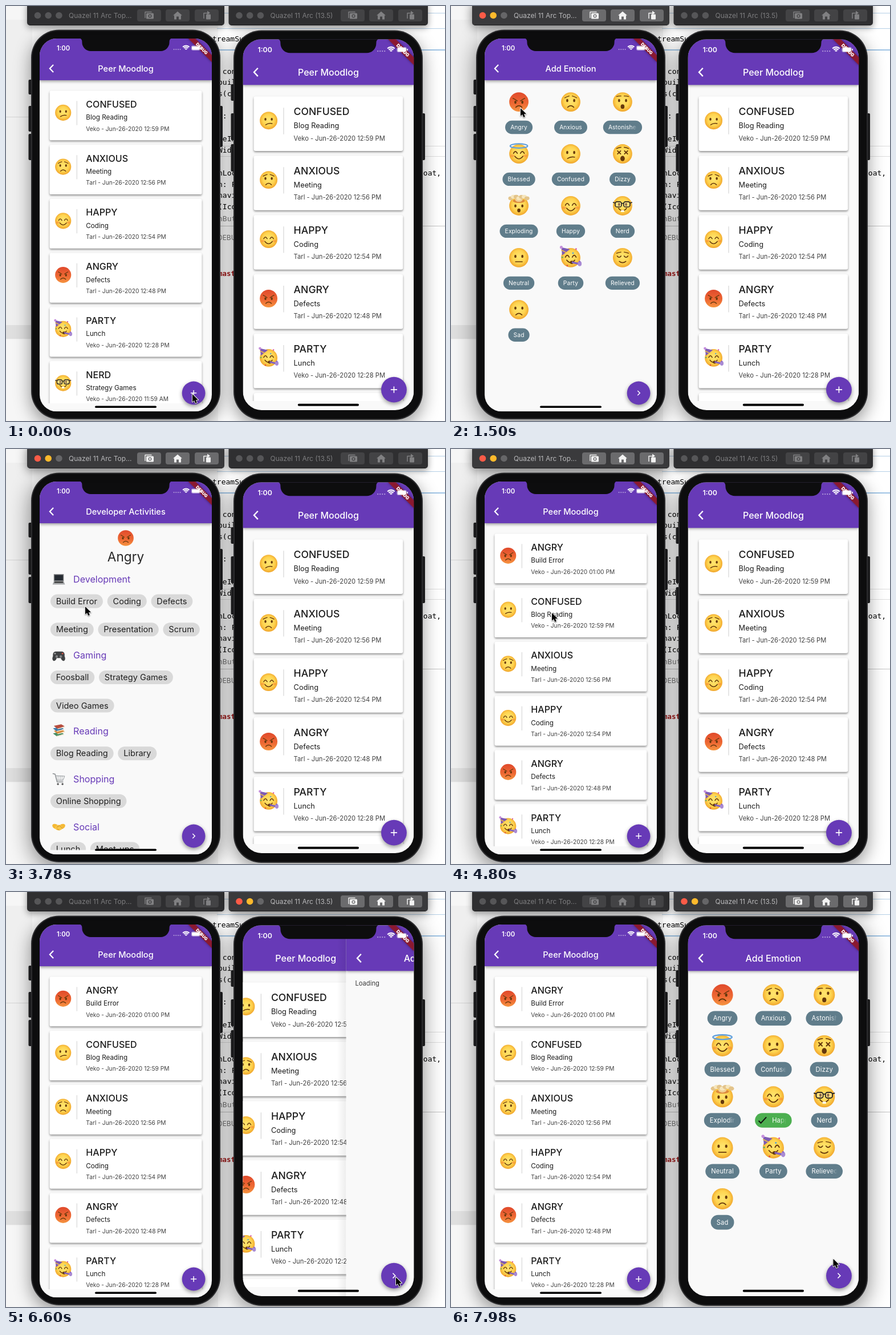
These frames come from a looping animation (770x727 px, 8000 ms). An HTML page with a canvas:

```html
<!DOCTYPE html>
<html lang="en">
<head>
<meta charset="utf-8">
<title>Two phones</title>
<style>
html, body { margin: 0; width: 100%; height: 100%; overflow: hidden; background: #fff; }
canvas { display: block; width: 100%; height: 100%; }
</style>
</head>
<body>
<canvas id="stage" width="770" height="727"></canvas>
<script>
const c = document.getElementById('stage').getContext('2d');
const LOOP = 8000, TAU = Math.PI * 2;
const SANS = 'Inter, sans-serif', MONO = '"DejaVu Sans Mono", monospace';
const PURPLE = '#673ab7', GREEN = '#4caf50', SLATE = '#607d8b', BROWN = '#65380c';
const APP = 'Peer Moodlog';
const clamp = v => Math.max(0, Math.min(1, v));

// ---------- timing ----------
const T = { wakeLeft: 150, add: 480, pickAngry: 1620, acts: 2660, pickBuild: 3900, done: 4340,
            wakeRight: 6240, addRight: 6539, pickHappy: 7480 };
const PATH = [[0, 327, 680], [560, 327, 680], [1440, 122, 179], [1700, 122, 179], [2460, 329, 676],
  [2780, 329, 676], [3600, 139, 276], [3960, 139, 276], [4260, 329, 676], [4380, 329, 676],
  [4780, 177, 287], [5300, 177, 287], [6060, 684, 675], [6720, 684, 675], [7260, 566, 392],
  [7540, 566, 392], [8097, 684, 675]];

// cubic-bezier(.35,.91,.33,.97), used for page slides
function slide(t, start) {
  const x = clamp((t - start) / 400);
  const bez = (a, b, u) => 3 * a * u * (1 - u) ** 2 + 3 * b * u * u * (1 - u) + u ** 3;
  let lo = 0, hi = 1;
  for (let i = 0; i < 20; i++) {
    const m = (lo + hi) / 2;
    if (bez(.35, .33, m) < x) lo = m; else hi = m;
  }
  return x === 1 ? 1 : x === 0 ? 0 : bez(.91, .97, lo);
}

// ---------- drawing helpers ----------
function text(s, x, y, size, color, weight = 400, align = 'left', family = SANS) {
  c.font = `${weight} ${size}px ${family}`;
  c.textAlign = align;
  c.fillStyle = color;
  c.fillText(s, x, y);
}
function box(x, y, w, h, r, color) {
  c.beginPath();
  c.roundRect(x, y, w, h, r);
  c.fillStyle = color;
  c.fill();
}
function oval(x, y, rx, ry, color, rot = 0) {
  c.beginPath();
  c.ellipse(x, y, rx, ry, rot, 0, TAU);
  c.fillStyle = color;
  c.fill();
}
function line(pts, color, w) {
  c.beginPath();
  for (let i = 0; i < pts.length; i += 2) c.lineTo(pts[i], pts[i + 1]);
  c.strokeStyle = color;
  c.lineWidth = w;
  c.stroke();
}
function poly(pts, color) {
  c.beginPath();
  for (let i = 0; i < pts.length; i += 2) c.lineTo(pts[i], pts[i + 1]);
  c.closePath();
  c.fillStyle = color;
  c.fill();
}
function curve(p, w = .1, color = BROWN) {
  c.beginPath();
  c.moveTo(p[0], p[1]);
  c.quadraticCurveTo(p[2], p[3], p[4], p[5]);
  c.strokeStyle = color;
  c.lineWidth = w;
  c.stroke();
}
function shadow(blur, dy, alpha) {
  c.shadowBlur = blur;
  c.shadowOffsetY = dy;
  c.shadowColor = `rgba(0,0,0,${alpha})`;
}
function at(x, y, k, draw) {
  c.save();
  c.translate(x, y);
  c.scale(k, k);
  c.lineCap = c.lineJoin = 'round';
  draw();
  c.restore();
}

// ---------- faces: unit radius ----------
const SMILE = [-.42, .25, 0, .78, .42, .25], FROWN = [-.32, .55, 0, .22, .32, .55];
const FACES = {
  Angry: { mouth: FROWN, brow: [-.1, -.38], eyeY: .02 },
  Anxious: { mouth: FROWN, brow: [-.62, -.42] },
  Astonished: { round: .23, brow: [-.62, -.56] },
  Blessed: { eyes: 'arch', mouth: SMILE, blush: true },
  Confused: { mouth: [-.33, .48, .02, .24, .4, .34] },
  Dizzy: { eyes: 'x', round: .27, brow: [-.68, -.55] },
  Exploding: { round: .2, eyeY: .02 },
  Happy: { eyes: 'arch', mouth: SMILE, blush: true },
  Nerd: { mouth: SMILE },
  Neutral: { mouth: [-.35, .42, 0, .42, .35, .42] },
  Party: { eyes: 'arch', mouth: SMILE },
  Relieved: { eyes: 'shut', mouth: [-.34, .38, 0, .66, .34, .38], brow: [-.58, -.46] },
  Sad: { mouth: FROWN }
};
function skin(kind) {
  const angry = kind === 'Angry';
  const g = angry ? c.createLinearGradient(0, -1, 0, 1) : c.createRadialGradient(0, -.1, .1, 0, -.05, 1.05);
  const tones = angry ? ['#e04a2c', '#ee6a34', '#f59440'] : ['#ffe36c', '#fed34f', '#f0a52c'];
  tones.forEach((v, i) => g.addColorStop([0, .6, 1][i], v));
  return g;
}
function face(kind, x, y, r) {
  const f = FACES[kind], ey = f.eyeY ?? -.15;
  at(x, y, r, () => {
    oval(0, 0, 1, 1, skin(kind));
    if (f.blush) for (const s of [-1, 1]) oval(s * .68, .2, .2, .14, 'rgba(245,120,50,.45)');
    for (const s of [-1, 1]) {
      const ex = s * .36;
      if (f.eyes === 'arch') curve([ex - .2, ey + .1, ex, ey - .3, ex + .2, ey + .1]);
      else if (f.eyes === 'shut') curve([ex - .2, ey - .02, ex, ey + .24, ex + .2, ey - .02]);
      else if (f.eyes === 'x') {
        line([ex - .16, ey - .16, ex + .16, ey + .16], BROWN, .11);
        line([ex - .16, ey + .16, ex + .16, ey - .16], BROWN, .11);
      } else oval(ex, ey, .11, .16, BROWN);
      if (f.brow) curve([s * .16, f.brow[0], s * .4, (f.brow[0] + f.brow[1]) / 2 - .04, s * .62, f.brow[1]], .08);
    }
    if (f.mouth) curve(f.mouth);
    if (f.round) oval(0, .48, f.round * .85, f.round, BROWN);
    if (EXTRA[kind]) EXTRA[kind]();
  });
}
const EXTRA = {
  Blessed() {
    c.beginPath();
    c.ellipse(0, -.82, .9, .22, 0, 0, TAU);
    c.strokeStyle = '#5f9fdc';
    c.lineWidth = .13;
    c.stroke();
  },
  Nerd() {
    for (const s of [-1, 1]) {
      c.beginPath();
      c.roundRect(s * .44 - .33, -.42, .66, .54, .2);
      c.fillStyle = 'rgba(255,255,255,.25)';
      c.fill();
      c.strokeStyle = '#2b2724';
      c.lineWidth = .1;
      c.stroke();
      line([s * .78, -.3, s * .96, -.34], '#2b2724', .1);
    }
    line([-.1, -.25, .1, -.25], '#2b2724', .1);
    box(-.17, .46, .34, .18, .04, '#fff');
  },
  Exploding() {
    oval(0, -.5, .62, .2, '#dd8a3c');
    oval(0, -.66, .4, .26, '#f0cf92');
    for (let i = 0; i < 7; i++)
      oval(-.84 + i * .28, -.78 - .2 * Math.sin(i * 2.1) ** 2, .26, .2, i % 2 ? '#f6e6bd' : '#e3c48b');
  },
  Party() {
    poly([-.98, -1.08, -.88, -.25, -.08, -.88], '#7d5bb4');
    line([-.95, -.78, -.5, -.56], '#e9b84b', .1);
    oval(-.98, -1.08, .15, .15, '#c590dc');
    oval(.12, .48, .2, .17, BROWN);
    line([.2, .48, .86, .64], '#8464bd', .2);
    oval(.93, .62, .2, .26, '#a98bd4');
    ['#d9539c', '#4aa3df', '#57b26a', '#8b62c4', '#e24d42'].forEach((v, i) =>
      oval(.98 * Math.sin(i * 2.3 + .6), -.9 + .43 * i, .08, .08, v));
  }
};

// ---------- activity icons: about 30 units wide ----------
const ICONS = [
  () => { poly([-12, -12, 12, -12, 12, 5, -12, 5], '#77797b'); box(-10, -10, 20, 13, 0, '#252b32');
          poly([-12, 5, 12, 5, 15, 13, -15, 13], '#a9abad'); poly([-10, 6, 10, 6, 11, 9, -11, 9], '#333'); },
  () => { box(-14, -9, 28, 16, 7, '#404244'); oval(-10, 6, 5, 8, '#404244', .3); oval(10, 6, 5, 8, '#404244', -.3);
          oval(-5, 3, 3, 3, '#808284'); oval(5, 3, 3, 3, '#808284'); oval(9, -4, 2, 2, '#d95745'); oval(-9, -4, 2, 2, '#aaa'); },
  () => ['#498d63', '#d7883a', '#3d79a8', '#b74c3d'].forEach((v, i) => {
          const y = 7 - i * 6, x = i % 2 ? 1 : -1;
          poly([x - 13, y - 2, x + 5, y - 6, x + 13, y - 1, x - 4, y + 5], v);
          line([x - 3, y + 5, x + 13, y + 1], '#f0e6cf', 2); }),
  () => { line([-14, -13, -9, -12, -4, 7, 10, 7], '#898d90', 2); line([-8, -8, 14, -7, 10, 3, -5, 3], '#a3a7aa', 1.6);
          for (let i = 0; i < 4; i++) line([-4 + i * 4, -8, -3 + i * 3.6, 3], '#a3a7aa', 1);
          oval(-2, 12, 2.4, 2.4, '#555'); oval(9, 12, 2.4, 2.4, '#555'); },
  () => { oval(-8, -1, 8, 5.5, '#f5b935', .5); oval(8, -1, 8, 5.5, '#f5b935', -.5); oval(0, 2, 9, 6.5, '#f9c748');
          line([-5, 1, 2, -3, 9, 4], '#c98520', 1.3); line([-4, 5, 1, 8], '#c98520', 1.2); }
];
const SECTIONS = [
  ['Development', ['Build Error', 'Coding', 'Defects'], ['Meeting', 'Presentation', 'Scrum']],
  ['Gaming', ['Foosball', 'Strategy Games'], ['Video Games']],
  ['Reading', ['Blog Reading', 'Library']],
  ['Shopping', ['Online Shopping']],
  ['Social', ['Lunch', 'Meet-ups']]
];
const ENTRIES = [
  ['Angry', 'Build Error', 'Veko', '01:00 PM'], ['Confused', 'Blog Reading', 'Veko', '12:59 PM'],
  ['Anxious', 'Meeting', 'Tarl', '12:56 PM'], ['Happy', 'Coding', 'Tarl', '12:54 PM'],
  ['Angry', 'Defects', 'Tarl', '12:48 PM'], ['Party', 'Lunch', 'Veko', '12:28 PM'],
  ['Nerd', 'Strategy Games', 'Veko', '11:59 AM']
];

// ---------- pages, in logical phone units ----------
function page(p, title, dx, body, edge) {
  c.save();
  c.translate(dx, 0);
  if (edge) {
    const g = c.createLinearGradient(-20, 0, 0, 0);
    g.addColorStop(0, 'rgba(0,0,0,0)');
    g.addColorStop(1, 'rgba(0,0,0,.07)');
    c.fillStyle = g;
    c.fillRect(-20, 0, 20, p.h);
  }
  c.beginPath();
  c.rect(0, 0, p.w, p.h);
  c.clip();
  box(0, 0, p.w, p.h, 0, '#f9f9f9');
  body();
  c.save();
  shadow(5, 2, .4);
  box(0, 0, p.w, 100, 0, PURPLE);
  c.restore();
  c.lineCap = 'butt';
  line([33, 63, 24.5, 72, 33, 81], '#fff', 3);
  text(title, p.w / 2, 79, 20, '#fff', 500, 'center');
  c.restore();
}
function list(p, first) {
  c.save();
  c.beginPath();
  c.rect(0, 100, p.w, p.h - 120);
  c.clip();
  ENTRIES.slice(first).forEach(([mood, what, who, when], i) => {
    const y = 125 + i * 129.9;
    if (y > p.h) return;
    c.save();
    shadow(3.5, 2, .42);
    box(24, y, p.w - 48, 119.5, 4, '#fff');
    c.restore();
    face(mood, 56.5, y + 53, 19.3);
    line([89.5, y + 25, 89.5, y + 83], '#cfcfcf', 1.3);
    text(mood.toUpperCase(), 111.5, y + 40.7, 22, '#1c1c1c', 500);
    text(what, 111.5, y + 70, 16, '#1c1c1c');
    text(`${who} - Jun-26-2020 ${when}`, 111.5, y + 96.5, 14, '#404040');
  });
  c.restore();
}
function grid(p, picked, amount) {
  const cell = (p.w - 40) / 3, max = cell - 31;
  c.save();
  c.letterSpacing = '0.2px';
  Object.keys(FACES).forEach((name, i) => {
    const x = 20 + cell * (i % 3 + .5), top = 120 + cell * Math.floor(i / 3);
    const on = name === picked ? amount : 0;
    face(name, x, top + 32.3, 23.2);
    c.font = `400 14px ${SANS}`;
    const tw = c.measureText(name).width, room = 25 * on;
    const w = Math.min(tw + 25 + room, max), left = x - w / 2, y = top + cell * .725 + 2.8;
    box(left, y - 16, w, 32, 16, on > .3 ? GREEN : SLATE);
    const tx = left + 12.5 + room, end = left + w - 12;
    let ink = '#fff';
    if (tx + tw > end) {
      ink = c.createLinearGradient(end - 16, 0, end, 0);
      ink.addColorStop(0, '#fff');
      ink.addColorStop(1, 'rgba(255,255,255,0)');
    }
    c.save();
    c.beginPath();
    c.rect(left, y - 16, w - 12, 32);
    c.clip();
    if (on > .3) line([left + 8, y + 1, left + 13, y + 6, left + 25, y - 7], '#111', 2.4);
    text(name, tx, y + 5, 14, ink);
    c.restore();
  });
  c.restore();
}
function activities(p, picked) {
  face('Angry', p.w / 2, 135.7, 19);
  text('Angry', p.w / 2, 192.5, 31, '#262626', 400, 'center');
  let y = 234.4;
  c.save();
  c.beginPath();
  c.rect(0, 100, p.w, 785);
  c.clip();
  SECTIONS.forEach(([name, ...rows], i) => {
    at(46, y, 1, ICONS[i]);
    text(name, 81, y + 8, 22, PURPLE);
    y += 53;
    rows.forEach((row, j) => {
      let x = 26;
      if (j) y += 68;
      for (const label of row) {
        c.font = `400 20px ${SANS}`;
        const w = c.measureText(label).width + 27;
        box(x, y - 16.5, w, 33, 16.5, picked === label ? GREEN : '#d9d9d9');
        text(label, x + 13.5, y + 7, 20, '#1f1f1f');
        x += w + 10.6;
      }
    });
    y += 61.7;
  });
  c.restore();
}
const loading = () => text('Loading', 20, 132.5, 14, '#3a3a3a');

function leftApp(p, t) {
  const a = slide(t, T.add), b = slide(t, T.acts), d = slide(t, T.done);
  const home = (first, k) => page(p, APP, -p.w / 3 * k, () => list(p, first));
  const acts = dx => page(p, 'Developer Activities', dx, () => activities(p, t > T.pickBuild ? 'Build Error' : ''), true);
  const add = dx => page(p, 'Add Emotion', dx,
    () => t < T.add + 200 ? loading() : grid(p, 'Angry', clamp((t - T.pickAngry) / 150)), true);
  if (t >= T.done) {
    home(0, 1 - d);
    if (d < 1) acts(p.w * d);
  } else if (t >= T.acts) {
    if (b < 1) add(-p.w / 3 * b);
    acts(p.w * (1 - b));
  } else {
    if (a < 1) home(1, a);
    if (a > 0) add(p.w * (1 - a));
  }
  return t < T.add || t >= T.done;
}
function rightApp(p, t) {
  const a = slide(t, T.addRight);
  if (a < 1) page(p, APP, -p.w / 3 * a, () => list(p, 1));
  if (a > 0) page(p, 'Add Emotion', p.w * (1 - a),
    () => t < T.addRight + 220 ? loading() : grid(p, 'Happy', clamp((t - T.pickHappy) / 150)), true);
  return t < T.addRight;
}

// ---------- phone shell ----------
function fab(p, plus) {
  const x = p.w - 43.7, y = p.h - 44.7;
  c.save();
  shadow(7, 3, .4);
  oval(x, y, 28, 28, PURPLE);
  c.restore();
  if (plus) {
    line([x - 7, y, x + 7, y], '#fff', 2);
    line([x, y - 7, x, y + 7], '#fff', 2);
  } else line([x - 2.5, y - 5.5, x + 3, y, x - 2.5, y + 5.5], '#fff', 2);
}
function banner(p) {
  c.save();
  c.translate(p.w, 0);
  c.rotate(Math.PI / 4);
  shadow(4, 0, .5);
  box(-40, 28, 80, 12, 0, 'rgba(150,25,40,.88)');
  c.shadowColor = 'transparent';
  text('DEBUG', 0, 37.7, 10.2, '#fff', 900, 'center');
  c.restore();
}
function status(p) {
  const e = p.w - p.inset;
  text('1:00', p.clock, 28.6, 15.5, '#fff', 600);
  for (let i = 0; i < 4; i++) oval(e - 79 + i * 5, 26, 1.3, 1.3, 'rgba(255,255,255,.55)');
  c.lineCap = 'butt';
  for (const r of [3, 7, 11]) {
    c.beginPath();
    c.arc(e - 50, 28, r, -Math.PI * .75, -Math.PI * .25);
    c.strokeStyle = '#fff';
    c.lineWidth = 2.7;
    c.stroke();
  }
  c.beginPath();
  c.roundRect(e - 37, 17.5, 21, 10.5, 3);
  c.strokeStyle = 'rgba(255,255,255,.6)';
  c.lineWidth = 1;
  c.stroke();
  box(e - 36, 18.5, 19, 8.5, 2, '#fff');
  box(e - 15, 20.5, 2, 4.5, 1, '#fff');
}
function notch(p) {
  const m = p.w / 2;
  c.beginPath();
  c.moveTo(m - 112, -1);
  c.quadraticCurveTo(m - 105, 0, m - 105, 8);
  c.arcTo(m - 105, 30, m, 30, 21);
  c.arcTo(m + 105, 30, m + 105, 8, 21);
  c.lineTo(m + 105, 8);
  c.quadraticCurveTo(m + 105, 0, m + 112, -1);
  c.fillStyle = '#0d0d0e';
  c.fill();
}
function toolbar(p, active) {
  c.save();
  shadow(active ? 18 : 12, 4, active ? .5 : .4);
  box(p.bar, -8, p.barW, 42, 5, active ? '#3a3a3c' : '#2f2f31');
  c.restore();
  line([p.bar + 4, 33.5, p.bar + p.barW - 4, 33.5], '#1c1c1d', 1);
  (active ? ['#fc5b47', '#fdb92c', '#666668'] : ['#565658', '#565658', '#565658'])
    .forEach((v, i) => oval(p.bar + 18.5 + i * 18.7, 16.5, 5.8, 5.8, v));
  text(p.name, p.bar + 73, 21, 12, active ? '#b9b9bb' : '#7d7d7f');
  const ink = active ? '#f2f2f2' : '#808082', bg = active ? '#6b6b6d' : '#434345';
  p.buttons.forEach((x, i) => {
    box(x, 6, 42, 21, 4, bg);
    at(x + 21, 16.5, 1, () => {
      if (i === 0) {
        line([-7, 4, -7, -6, 4, -6], ink, 1.4);
        box(-5, -4, 13, 10, 1.5, ink);
        oval(1.5, 1, 3, 3, bg);
        oval(1.5, 1, 1.7, 1.7, ink);
      } else if (i === 1) {
        poly([-8, 0, 0, -7, 8, 0, 6, 0, 6, 7, 2, 7, 2, 2, -2, 2, -2, 7, -6, 7, -6, 0], ink);
      } else {
        box(-1, -2, 8, 9, 1, ink);
        line([-5, 5, -5, -4, 2, -4], ink, 1.5);
        poly([1, -8, 6, -4.5, 1, -1], ink);
      }
    });
  });
}
function phone(p, t, active) {
  for (const [y, h] of p.keys) box(p.x - 5.5, y, 9, h, 2, '#222224');
  box(p.x + 326, p.keys[1][0], 9, p.power, 2, '#222224');
  c.save();
  shadow(active ? 38 : 30, 10, active ? .48 : .42);
  box(p.x - 1, p.y - .5, 332, 682.5, 49, '#2c2c2e');
  c.restore();
  box(p.x + 1, p.y + 1.5, 328, 678.5, 47, '#0d0d0e');
  c.save();
  c.translate(p.sx, p.sy);
  c.scale(p.k, p.k);
  c.beginPath();
  c.roundRect(0, 0, p.w, p.h, 41);
  c.clip();
  const plus = p.app(p, t);
  fab(p, plus);
  banner(p);
  status(p);
  notch(p);
  box(p.w / 2 - p.home / 2, p.h - 14, p.home, 5, 2.5, '#050505');
  c.restore();
  toolbar(p, active);
}
const LEFT = { x: 45, y: 42, sx: 59, sy: 57, k: 302 / 414, w: 414, h: 896, app: leftApp, home: 148,
  clock: 41, inset: 12, bar: 37, barW: 346, name: 'Quazel 11 Arc Top...', buttons: [230, 280, 331],
  keys: [[129, 26], [175, 45], [224, 46]], power: 72 };
const RIGHT = { x: 400, y: 43, sx: 415.4, sy: 58.3, k: .8, w: 375, h: 812, app: rightApp, home: 134,
  clock: 32.5, inset: 0, bar: 390.5, barW: 349.5, name: 'Quazel 11 Arc (13.5)', buttons: [587, 637, 688],
  keys: [[137, 29], [188, 47], [242, 48]], power: 82 };

// ---------- desktop behind the phones ----------
const CODE = [['treamSu', 362, 62], [' con', 372, 119], ['buil', 372, 138], ['s(co', 372, 158], ['e:', 372, 197],
  ['geIn', 372, 237], ['Widg', 372, 257], ['nLoc', 372, 297], ['loat,', 724, 297], ['n: Fl', 372, 317],
  ['navi', 372, 336], ['(Icon', 372, 356]];
function desktop() {
  box(0, 0, 770, 727, 0, '#fff');
  box(0, 0, 372, 727, 0, '#f6f6f6');
  box(0, 24, 46, 560, 0, '#efefef');
  box(0, 559, 46, 24, 0, '#dfdfdf');
  line([0, 194.5, 46, 194.5], '#d4d4d4', 1);
  for (const y of [12.5, 39.5]) line([370, y, 770, y], '#b5cfe6', 1);
  line([362, 77, 770, 77], '#7fb0dc', 1.6);
  for (const y of [245.5, 263.5]) line([370, y, 770, y], '#dedede', 1);
  line([370, 385.5, 770, 385.5], '#c4c4c4', 1);
  for (const [s, x, y] of CODE) text(s, x, y, 13, '#000', 400, 'left', MONO);
  text('nBut', 372, 377, 13, '#777', 400, 'left', MONO);
  text('DEBUG', 371, 410, 12, '#777');
  text('maste', 372, 473, 12.5, '#a31515', 700, 'left', MONO);
}
function cursor(t) {
  const i = PATH.findIndex((k, n) => n && t < k[0]);
  const [t0, x0, y0] = PATH[i - 1], [t1, x1, y1] = PATH[i];
  const u = (t - t0) / (t1 - t0), e = u * u * (3 - 2 * u);
  at(x0 + (x1 - x0) * e, y0 + (y1 - y0) * e, 1, () => {
    const arrow = [0, 0, 0, 13.5, 3.2, 10.8, 5.4, 15.8, 7.8, 14.8, 5.7, 9.9, 10, 9.9];
    shadow(2, 1, .35);
    line([...arrow, 0, 0], '#fff', 2);
    poly(arrow, '#000');
  });
}

function draw(now) {
  const t = now % LOOP;
  c.clearRect(0, 0, 770, 727);
  desktop();
  phone(LEFT, t, t >= T.wakeLeft && t < T.wakeRight);
  phone(RIGHT, t, t >= T.wakeRight);
  cursor(t);
}
let begin;
function tick(now) {
  begin ??= now;
  draw(Math.max(0, now - begin));
  requestAnimationFrame(tick);
}
requestAnimationFrame(tick);
</script>
</body>
</html>
```
